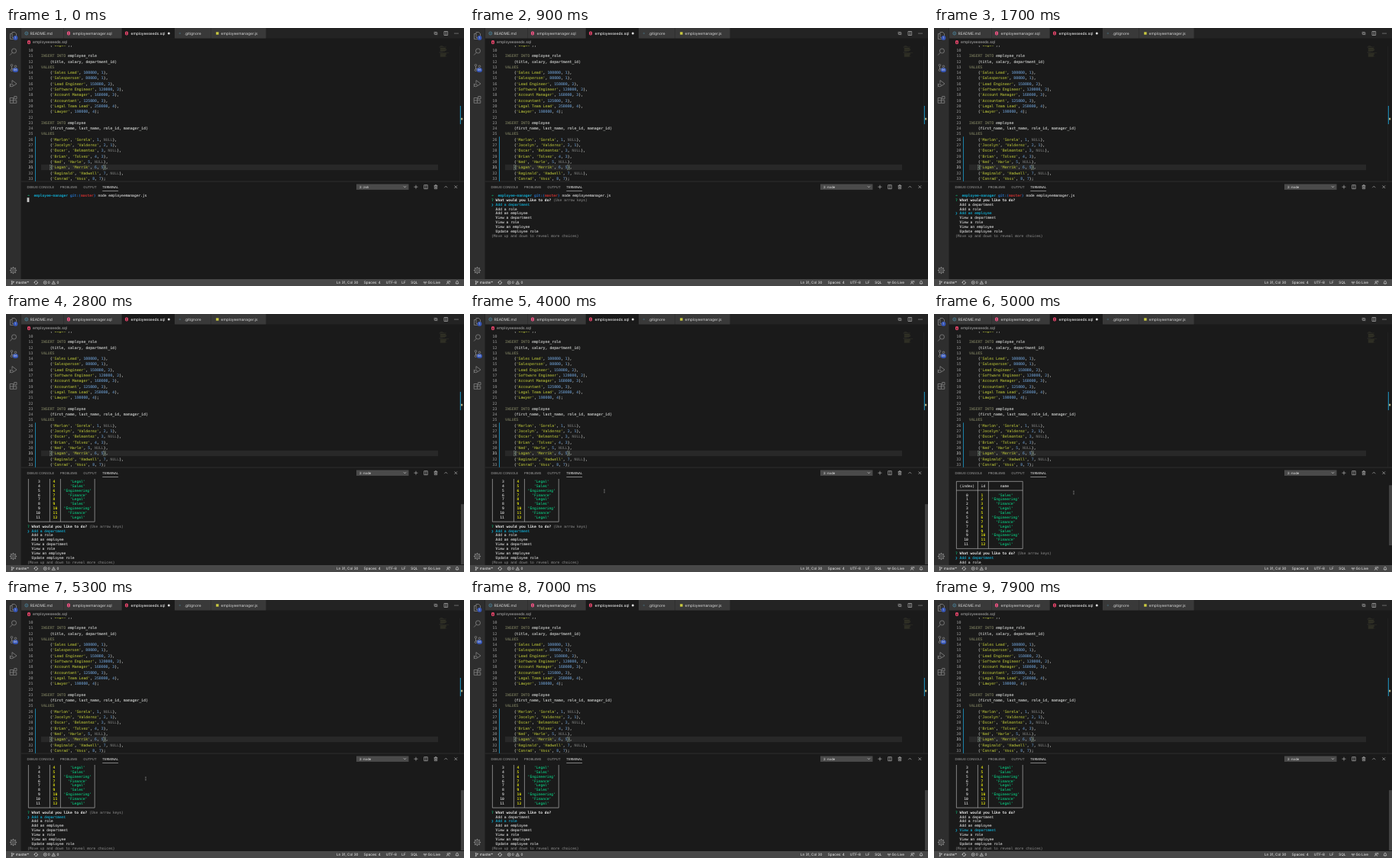
An HTML page for the animation above (8000 ms loop, 600x338 px).

```html
<!DOCTYPE html>
<html lang="en">
<head>
<meta charset="utf-8">
<title>Editor with terminal</title>
<style>
  html, body { margin: 0; width: 100%; height: 100%; overflow: hidden; background: #1a1a1a; }
  svg { display: block; width: 100vw; height: 100vh; }
  text { white-space: pre; text-rendering: geometricPrecision; font-family: Inter, sans-serif; }
  .code, .term, .code tspan { fill: currentColor; stroke: currentColor; stroke-width: .12; }
  .code { font: 4.85px "DejaVu Sans Mono", monospace; }
  .term { font: 4.65px "DejaVu Sans Mono", monospace; }
  .bold { font-weight: bold; stroke: none; }
</style>
</head>
<body>
<svg viewBox="0 0 600 338">
  <defs>
    <clipPath id="editorClip"><rect x="20" y="23" width="580" height="178"/></clipPath>
    <clipPath id="termClip"><rect x="20" y="216" width="580" height="112.5"/></clipPath>
  </defs>
  <g id="chrome"></g>
  <g id="editor" clip-path="url(#editorClip)"></g>
  <g id="terminal" clip-path="url(#termClip)"></g>
  <text id="shell" x="463" y="209.7" font-size="4.3" fill="#f0f0f0"></text>
  <path id="pointer" d="M-.9-2.2Q0-2.2 0-1.5V1.5Q0 2.2-.9 2.2M.9-2.2Q0-2.2 0-1.5M0 1.5Q0 2.2 .9 2.2" fill="none" stroke="#999" stroke-width=".5"/>
</svg>
<script>
const LOOP = 8000;
const $ = id => document.getElementById(id);

const rect = (x, y, w, h, fill, extra = '') =>
  `<rect x="${x}" y="${y}" width="${w}" height="${h}" fill="${fill}" ${extra}/>`;
const circle = (x, y, r, fill) => `<circle cx="${x}" cy="${y}" r="${r}" fill="${fill}"/>`;
const label = (x, y, str, size, fill) =>
  `<text x="${x}" y="${y}" font-size="${size}" fill="${fill}">${str}</text>`;
const mono = (x, y, str, color, cls) => `<text class="${cls}" x="${x}" y="${y}" color="${color}">${str}</text>`;
const icon = (x, y, d, color = '#c5c5c5', width = .6) =>
  `<path transform="translate(${x} ${y})" d="${d}" fill="none" stroke="${color}" stroke-width="${width}"/>`;
const ring = (x, y, r) => `M${x - r} ${y}a${r} ${r} 0 1 0 ${2 * r} 0a${r} ${r} 0 1 0 ${-2 * r} 0`;

const SPLIT = 'M-2.3-2.5H2.3V2.5H-2.3ZM0-2.5V2.5';
const DATABASE = 'M-1.5-1.6V1.6Q0 2.6 1.5 1.6V-1.6M-1.5-1.6Q0-2.6 1.5-1.6Q0-.6-1.5-1.6M-1.5 0Q0 1 1.5 0';

function drawChrome() {
  let s = rect(0, 0, 600, 338, '#1a1a1a') + rect(20, 0, 580, 13.5, '#232323');

  // Tabs
  const tabs = [
    [20, 56, 'README.md'], [76, 76, 'employeemanager.sql'], [152, 69, 'employeeseeds.sql'],
    [221, 48, '.gitignore'], [269, 72, 'employeemanager.js']
  ];
  tabs.forEach(([x, w, name], i) => {
    const active = i === 2;
    s += rect(x, 0, w - .4, 13.5, active ? '#1a1a1a' : '#393939');
    s += label(x + (i > 2 ? 12.5 : 11.5), 8.8, name, 4.95, active ? '#fff' : '#d6d6d6');
  });
  s += icon(26.8, 7, ring(0, 0, 2) + 'M0-.4V1.2M0-1.2V-.8', '#519aba');
  s += icon(82, 7, DATABASE, '#f55385', 1) + icon(158, 7, DATABASE, '#e8456b', 1);
  s += circle(213.3, 7, 1.5, '#ddd') + circle(227.8, 7, 1.3, '#41535b') + rect(275.2, 5.3, 3.4, 3.4, '#cbcb41');
  s += icon(563, 7, 'M-1.8-2.2V1.2H.6M1.8 2.2V-1.2H-.6M-.3.3L.6 1.2L-.3 2.1M.3-2.1L-.6-1.2L.3-.3');
  s += icon(576.3, 7, SPLIT);
  for (const x of [588, 590, 592]) s += circle(x, 7, .55, '#c5c5c5');

  // Breadcrumb
  s += icon(30, 18.7, DATABASE, '#e8456b', 1) + label(35, 20.4, 'employeeseeds.sql', 4.95, '#b4b4b4');

  // Activity bar
  const dim = '#858585';
  s += rect(0, 0, 19.6, 329, '#2e2e2e');
  s += icon(9.5, 10, 'M-1.5-4.5H2L4-2.5V2.5H-1.5ZM-1.5-2.5H-4V4.5H2V2.5', dim, .8);
  s += icon(9.5, 31, ring(1, -1, 3) + 'M-1.2 1.2L-4.3 4.5', dim, .8);
  s += icon(9.5, 52, ring(-2, -3.2, 1.3) + ring(-2, 3.2, 1.3) + ring(3, -1.7, 1.3) + 'M-2-2V2M3-.4Q3 1.4-2 1.4', dim, .8);
  s += icon(9.5, 73, 'M-1.5-1V-4.5L4.5 0L0 3' + ring(-2, 2, 1.8) + 'M-4.8 0L-3.5 1M-5 2H-3.8M-4.8 4.2L-3.5 3', dim, .8);
  s += icon(9.5, 94, 'M-4.3-2.5H0V4.3H-4.3ZM-4.3.9H4.3V4.3H0M1.2-4.4H4.5V-1.1H1.2Z', dim, .8);
  s += circle(12.5, 13, 2.9, '#3655b5') + label(11.6, 14.3, '1', 3.6, '#fff');
  s += rect(8.8, 52.2, 7.2, 5.8, '#3655b5', 'rx="2.9"') + label(10, 56.4, '56', 3.6, '#fff');
  s += icon(9.5, 317.5, ring(0, 0, 1.4) + ring(0, 0, 3.2), dim, .8);
  for (let a = 0; a < 360; a += 45)
    s += `<path d="M0-3.2V-4.6" transform="translate(9.5 317.5) rotate(${a})" stroke="${dim}" stroke-width="1.3"/>`;

  // Panel header
  s += rect(20, 200.8, 580, .5, '#414141');
  [[27.5, 'DEBUG CONSOLE'], [71, 'PROBLEMS'], [101.3, 'OUTPUT'], [126.3, 'TERMINAL']].forEach(([x, name], i) =>
    s += label(x, 209.7, name, 4.15, i === 3 ? '#f0f0f0' : '#a4a4a4'));
  s += rect(126.3, 213.2, 20.8, .5, '#e7e7e7');
  s += rect(459, 204.5, 68.5, 7.4, '#4a4a4a') + icon(522.5, 208, 'M-1.5-.7L0 .8L1.5-.7', '#eee');
  s += icon(537, 208.2, 'M-2.5 0H2.5M0-2.5V2.5') + icon(550, 208.2, SPLIT);
  s += icon(563, 208.2, 'M-2.3-1.6H2.3M-.8-1.6V-2.6H.8V-1.6M-1.7-1.6V2.5H1.7V-1.6M-.5-.6V1.5M.5-.6V1.5');
  s += icon(576.3, 208.2, 'M-2 1L0-1L2 1') + icon(589.3, 208.2, 'M-1.8-1.8L1.8 1.8M1.8-1.8L-1.8 1.8');

  // Status bar
  s += rect(0, 329, 600, 9, '#484848');
  const status = (x, str) => label(x, 335.2, str, 4.65, '#f4f4f4');
  s += icon(8.7, 333.5, ring(-1, -1.6, .6) + ring(-1, 1.8, .6) + ring(1.2, -1, .6) + 'M-1-1V1.2M1.2-.4Q1.2.6-1 .7', '#f4f4f4', .5);
  s += status(12.8, 'master*');
  s += icon(39.3, 333.5, 'M-2 .2A2 2 0 0 1 1.6-1.2M2-.2A2 2 0 0 1-1.6 1.2M-2.7-.5L-2 .3L-1.2-.4M2.7.5L2-.3L1.2.4', '#f4f4f4');
  s += icon(51.3, 333.5, ring(0, 0, 2) + 'M-.8-.8L.8.8M.8-.8L-.8.8', '#f4f4f4', .5) + status(54.8, '0');
  s += icon(62.3, 333.5, 'M0-2L2.2 1.9H-2.2ZM0-.6V.6M0 1V1.4', '#f4f4f4', .5) + status(66.6, '0');
  [[433, 'Ln 31, Col 30'], [468.8, 'Spaces: 4'], [497.7, 'UTF-8'], [518.3, 'LF'], [530.3, 'SQL'], [552.5, 'Go Live']]
    .forEach(([x, str]) => s += status(x, str));
  s += icon(549, 333.5, ring(0, -.3, .5) + 'M-1.2.9A1.7 1.7 0 0 1-1.2-1.5M1.2.9A1.7 1.7 0 0 0 1.2-1.5M0 0V2.2', '#f4f4f4', .5);
  s += icon(579.3, 333.5, ring(-.3, -.9, 1) + 'M-2.1 2.2Q-2 .4-.3.4Q1.4.4 1.5 2.2M1-2H2.4V0', '#f4f4f4', .5);
  s += icon(591, 333.5, 'M-2 1.2Q-1.3.5-1.3-.6Q-1.2-2.2 0-2.2Q1.2-2.2 1.3-.6Q1.3.5 2 1.2ZM-.5 2H.5', '#f4f4f4', .5);
  $('chrome').innerHTML = s;
}

const SOURCE = `    ('Legal');

INSERT INTO employee_role
    (title, salary, department_id)
VALUES
    ('Sales Lead', 100000, 1),
    ('Salesperson', 80000, 1),
    ('Lead Engineer', 150000, 2),
    ('Software Engineer', 120000, 2),
    ('Account Manager', 160000, 3),
    ('Accountant', 125000, 3),
    ('Legal Team Lead', 250000, 4),
    ('Lawyer', 190000, 4);

INSERT INTO employee
    (first_name, last_name, role_id, manager_id)
VALUES
    ('Marlon', 'Sorela', 1, NULL),
    ('Jocelyn', 'Valderez', 2, 1),
    ('Oscar', 'Belmontez', 3, NULL),
    ('Brian', 'Tolvez', 4, 3),
    ('Ned', 'Harle', 5, NULL),
    ('Logan', 'Merrik', 6, 5),
    ('Reginald', 'Hadwell', 7, NULL),
    ('Conrad', 'Voss', 8, 7);`.split('\n');

const CODE_TEXT = '#c8cac8';

function tokenColor(token) {
  if (token[0] === "'") return '#a3ab36';
  if (/^(INSERT|INTO|VALUES)$/.test(token)) return '#74765a';
  if (token === 'NULL') return '#676867';
  return /^\d/.test(token) ? '#6089b4' : CODE_TEXT;
}

function drawEditor() {
  const left = 46, charW = 2.92, lineY = n => 29.2 + (n - 10) * 7.3;
  let s = rect(46, lineY(31) - 3.65, 520, 7.3, '#282828');
  s += rect(38, lineY(26) - 3.65, 1, 58.5, '#1b81a8');
  for (const col of [4, 28])
    s += rect(left + col * charW, lineY(31) - 3.2, charW, 6.6, '#26342a', 'stroke="#888" stroke-width=".4"');
  SOURCE.forEach((line, i) => {
    const n = i + 9, y = lineY(n) + 1.7;
    if (n > 9) s += mono(29.5, y, n, n === 31 ? '#c6c6c6' : '#858585', 'code');
    const spans = line.replace(/'[^']*'|\w+|[^\w']+/g, t => `<tspan color="${tokenColor(t)}">${t}</tspan>`);
    s += mono(left, y, spans, CODE_TEXT, 'code');
  });
  // Minimap and overview ruler
  SOURCE.forEach((line, i) => {
    const indent = line.startsWith(' ') ? 1.2 : 0;
    if (line) s += rect(567.5 + indent, 23 + i * .6, line.length * .24, .35, indent ? '#77774a' : '#68685d', 'opacity=".4"');
  });
  s += rect(594.6, 24, .4, 177, '#2b2b2b') + rect(594.8, 102, 1.2, 24, '#1b81a8') + rect(596, 117.8, 2.2, 2.6, '#b0a878');
  $('editor').innerHTML = s;
}

const WHITE = '#cccccc', GREEN = '#0dbc79', CYAN = '#11a8cd', BLUE = '#2472c8', RED = '#cd3131',
  YELLOW = '#e5e510', GRAY = '#777777';
const COL = 2.8, ROW = 5.87, TERM_LEFT = 28, TERM_TOP = 216.4, VISIBLE_ROWS = 19;
const CHOICES = ['Add a department', 'Add a role', 'Add an employee', 'View a department', 'View a role',
  'View an employee', 'Update employee role'];
const DEPARTMENTS = ['Sales', 'Engineering', 'Finance', 'Legal'];
const QUESTION = [[0, '?', GREEN], [2, 'What would you like to do?', '#f0f0f0', true]];
const PROMPT = [[0, '➜', GREEN, true], [3, 'employee-manager', CYAN, true], [20, 'git:(', BLUE, true],
  [25, 'master', RED, true], [31, ')', BLUE, true], [33, 'node employeemanager.js', WHITE]];

// A line is a list of [column, text, colour, bold].
const menu = (selected, hint) => [
  hint ? [...QUESTION, [29, '(Use arrow keys)', GRAY]] : QUESTION,
  ...CHOICES.map((c, i) => i === selected ? [[0, '❯', CYAN], [2, c, CYAN]] : [[2, c, WHITE]]),
  [[0, '(Move up and down to reveal more choices)', GRAY]]
];

function tableLines() {
  const centered = (col, width, str, color) => [col + Math.floor((width - str.length) / 2), str, color];
  const cells = (index, id, name, colors) =>
    [centered(1, 9, index, colors[0]), centered(11, 4, id, colors[1]), centered(16, 15, name, colors[2])];
  const rows = Array.from({ length: 12 }, (_, i) =>
    cells(`${i}`, `${i + 1}`, `'${DEPARTMENTS[i % 4]}'`, [WHITE, YELLOW, GREEN]));
  return [[], cells('(index)', 'id', 'name', [WHITE, WHITE, WHITE]), [], ...rows, []];
}

function tableBorder(row) {
  const x = col => TERM_LEFT + (col + .5) * COL, y = r => TERM_TOP + (row + r + .5) * ROW;
  const d = [0, 2, 15].map(r => `M${x(0)} ${y(r)}H${x(31)}`).join('') +
    [0, 10, 15, 31].map(c => `M${x(c)} ${y(0)}V${y(15)}`).join('');
  return `<path d="${d}" fill="none" stroke="#c4c4c4" stroke-width=".6"/>`;
}

function drawTerminal({ selected, table, offset, hint }) {
  let lines = [PROMPT], s = '';
  if (table) {
    lines.push([...QUESTION, [29, CHOICES[3], CYAN]], ...tableLines());
    s += tableBorder(2 - offset);
  }
  if (selected >= 0) lines.push(...menu(selected, hint));
  else s += rect(27.6, TERM_TOP + ROW, 2.8, 5.8, '#c8c8c8');

  lines.forEach((line, i) => {
    const y = TERM_TOP + (i - offset + .5) * ROW + 1.6;
    for (const [col, str, color, bold] of line)
      s += mono(TERM_LEFT + col * COL, y, str, color, bold ? 'term bold' : 'term');
  });
  if (lines.length > VISIBLE_ROWS) {
    const unit = 112 / lines.length;
    s += rect(596, 216 + offset * unit, 4, VISIBLE_ROWS * unit, '#414141');
  }
  $('terminal').innerHTML = s;
}

// Value of the last [time, value] step reached.
const stepAt = (steps, t) => steps.filter(([time]) => time <= t).pop()[1];
const SELECTION = [[0, -1], [900, 0], [1300, 1], [1500, 2], [2100, 3], [2800, 0], [6600, 1], [7300, 2], [7600, 3]];
const SCROLL = [[0, 0], [2800, 8], [4400, 7], [4500, 4], [4600, 2], [5100, 4], [5200, 6], [5300, 8]];
const POINTER = [[3600, 160, 256], [4000, 176, 232], [4400, 183, 234], [6600, 183, 234]];

function placePointer(t) {
  const i = POINTER.findIndex(([time]) => time > t);
  $('pointer').style.display = i > 0 ? '' : 'none';
  if (i < 1) return;
  const [t0, x0, y0] = POINTER[i - 1], [t1, x1, y1] = POINTER[i], k = (t - t0) / (t1 - t0);
  $('pointer').setAttribute('transform', `translate(${x0 + (x1 - x0) * k} ${y0 + (y1 - y0) * k})`);
}

let shown = '';
function frame() {
  const t = performance.now() % LOOP;
  const state = { selected: stepAt(SELECTION, t), table: t >= 2800, offset: stepAt(SCROLL, t) };
  state.hint = state.selected === 0;
  const key = JSON.stringify(state);
  if (key !== shown) drawTerminal(state);
  shown = key;
  $('shell').textContent = t < 100 ? '2: zsh' : '2: node';
  placePointer(t);
  requestAnimationFrame(frame);
}

drawChrome();
drawEditor();
frame();
</script>
</body>
</html>
```
